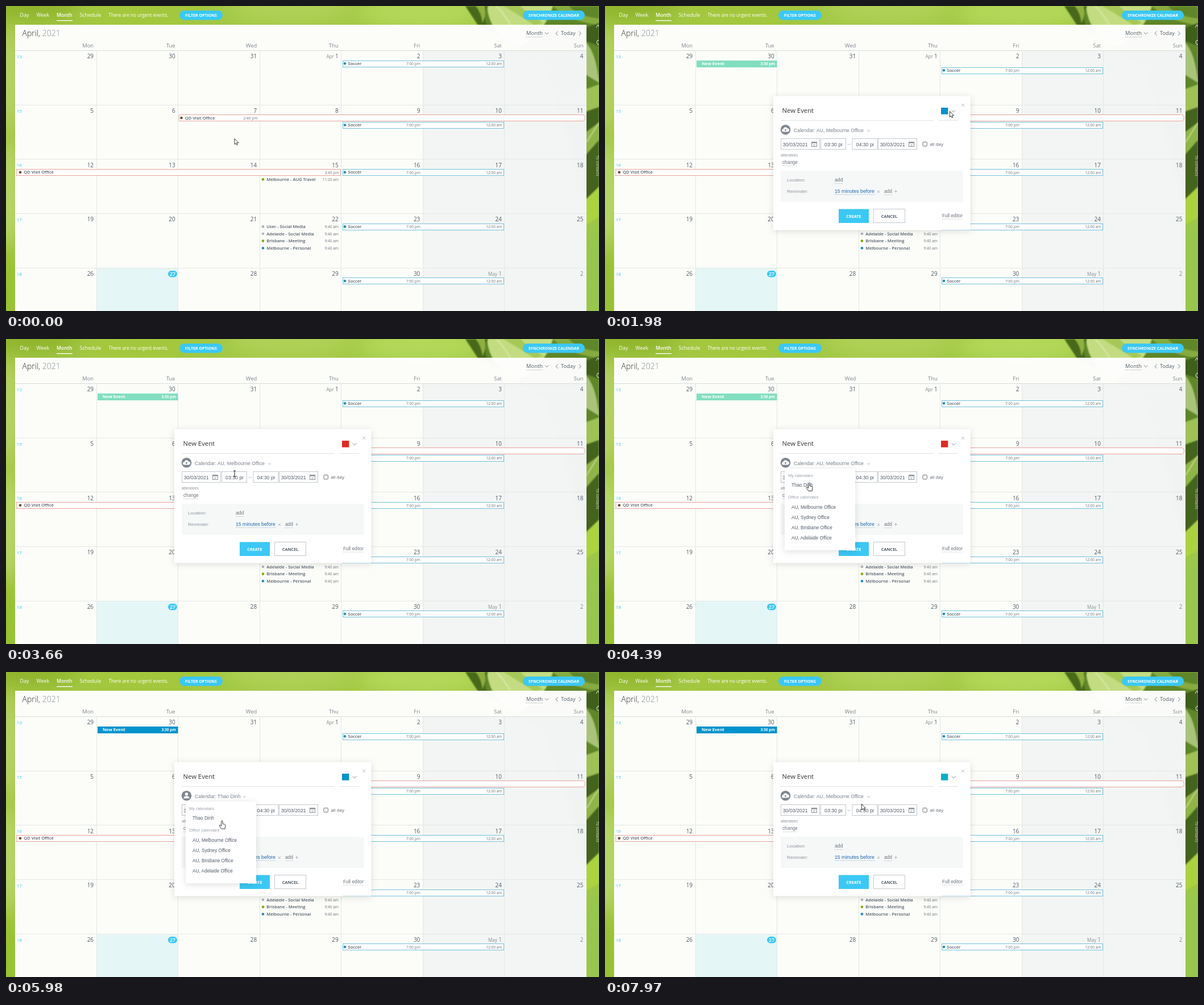
An HTML page for the animation above (8 s loop, 1043 px wide and 537 px high).

```html
<!DOCTYPE html>
<html lang="en">
<head>
<meta charset="utf-8">
<title>Calendar</title>
<style>
html, body { margin: 0; width: 100%; height: 100%; overflow: hidden; background: #a3c845; }
svg { display: block; }
text { font-family: "Open Sans", sans-serif; white-space: pre; }
.ar { font-family: "Liberation Sans", Arial, sans-serif; }
.blur { filter: blur(16px); }
.soft { filter: blur(1.2px); }
.shade { filter: drop-shadow(0 2px 6px rgba(0, 0, 0, .13)); }

/* 1% = 80 ms */
.step { animation: 8s step-end infinite; }
.shift { animation-name: shift; }
.event { animation-name: event; }
.fill { animation-name: fill; }
.sel { animation-name: sel; }
.title { animation-name: title; }
.swatch { animation-name: swatch; }
.picker { animation-name: picker; }
.drop { animation-name: drop; }
.office { animation-name: office; }
.person { animation-name: person; }
.arrow { animation-name: arrow; }
.beam { animation-name: beam; }
.hand { animation-name: hand; }
.click { animation-name: click; }
.popup { animation: popup 8s linear infinite; }
.cursor { animation: move 8s cubic-bezier(.4, .1, .6, .9) infinite; }

@keyframes shift { 0% { transform: none } 10%, 100% { transform: translateY(12px) } }
@keyframes event { 0% { opacity: 0 } 10%, 100% { opacity: 1 } }
@keyframes fill { 0% { fill: #82dec0 } 57%, 100% { fill: #0092cc } }
@keyframes popup { 0%, 11.8% { opacity: 0 } 12.8%, 100% { opacity: 1 } }
@keyframes sel { 0% { opacity: 1 } 23.6%, 100% { opacity: 0 } }
@keyframes title { 0% { fill: #fff } 23.6%, 100% { fill: #333 } }
@keyframes swatch { 0% { fill: #0092cc } 37.3% { fill: #de2b24 } 57% { fill: #0092cc } 95%, 100% { fill: #00afc7 } }
@keyframes picker { 0% { opacity: 0 } 26.8% { opacity: 1 } 37.3% { opacity: 0 } 88.3% { opacity: 1 } 95%, 100% { opacity: 0 } }
@keyframes drop { 0% { opacity: 0 } 49% { opacity: 1 } 57% { opacity: 0 } 70.8% { opacity: 1 } 79.5%, 100% { opacity: 0 } }
@keyframes office { 0% { opacity: 1 } 57% { opacity: 0 } 79.5%, 100% { opacity: 1 } }
@keyframes person { 0% { opacity: 0 } 57% { opacity: 1 } 79.5%, 100% { opacity: 0 } }
@keyframes arrow { 0% { opacity: 1 } 44.5% { opacity: 0 } 57.5% { opacity: 1 } 60.3% { opacity: 0 } 63.3% { opacity: 1 } 68.5% { opacity: 0 } 80% { opacity: 1 } 86.2% { opacity: 0 } 95.6%, 100% { opacity: 1 } }
@keyframes beam { 0% { opacity: 0 } 44.5% { opacity: 1 } 47%, 100% { opacity: 0 } }
@keyframes hand { 0% { opacity: 0 } 47% { opacity: 1 } 57.5% { opacity: 0 } 60.3% { opacity: 1 } 63.3% { opacity: 0 } 68.5% { opacity: 1 } 80% { opacity: 0 } 86.2% { opacity: 1 } 95.6%, 100% { opacity: 0 } }
@keyframes click {
  0%, 10%, 26.8%, 37.3%, 49%, 57%, 70.8%, 79.5%, 88.4%, 95%, 100% { opacity: 0 }
  9%, 25.8%, 36.3%, 48%, 56.3%, 70%, 78.8%, 87%, 94.2% { opacity: 1 }
}
@keyframes move {
  0%, 1% { transform: translate(401.5px, 233px) }
  8.7%, 14% { transform: translate(241.5px, 107px) }
  22.3%, 26.8% { transform: translate(606px, 185px) }
  36%, 37.5% { transform: translate(640px, 300px) }
  42.5% { transform: translate(524px, 262px) }
  45.75% { transform: translate(402px, 237px) }
  48%, 49.5% { transform: translate(392px, 220px) }
  53%, 57% { transform: translate(359px, 253px) }
  61.2%, 62.8% { transform: translate(597px, 181px) }
  67% { transform: translate(434px, 222px) }
  69.8%, 71.5% { transform: translate(398px, 218px) }
  77.5%, 79.5% { transform: translate(366px, 295px) }
  86.8%, 88.6% { transform: translate(595.5px, 184px) }
  94%, 95.2% { transform: translate(668px, 228px) }
  99.6%, 100% { transform: translate(451px, 232px) }
}
</style>
</head>
<body>
<svg id="stage" width="1043" height="537" viewBox="0 0 1043 537"></svg>
<script>
const rect = (x, y, w, h, fill, extra = '') =>
  `<rect x="${x}" y="${y}" width="${w}" height="${h}" fill="${fill}" ${extra}/>`;
const path = (d, fill, extra = '') => `<path d="${d}" fill="${fill}" ${extra}/>`;
const line = (d, color, w = 1, extra = '') => path(d, 'none', `stroke="${color}" stroke-width="${w}" ${extra}`);
const disc = (x, y, r, fill, extra = '') => `<circle cx="${x}" cy="${y}" r="${r}" fill="${fill}" ${extra}/>`;
const text = (x, y, size, fill, s, extra = '') =>
  `<text x="${x}" y="${y}" font-size="${size}" fill="${fill}" ${extra}>${s}</text>`;
const group = (cls, ...parts) => `<g class="${cls}">${parts.join('')}</g>`;
const END = 'text-anchor="end"', MID = 'text-anchor="middle"';
const SEMI = 'font-weight="600"', BOLD = 'font-weight="700"', LIGHT = 'font-weight="300"';
const AR = 'class="ar"', DASH = 'stroke-dasharray="2 1"';
const CYAN = '#3bc8f5', TEAL = '#1f8fb3', GREY = '#9aa1a9', INK = '#525c69';

const colX = c => 16 + c * 143.57;
const rowY = r => 79 + r * 95.7;
const slotY = (r, s) => rowY(r) + 22.3 + s * 12.6;
const barTop = y => Math.floor(y - 5.2) + .5;

function backdrop() {
  const blobs = [
    [40, 0, 90, 26, '#8fb42c'], [240, 10, 110, 30, '#a3c73c'], [500, 0, 110, 30, '#b0d158'],
    [730, 10, 110, 30, '#b4d85a'], [0, 130, 30, 90, '#b5d164'], [0, 330, 30, 90, '#b5d667'],
    [0, 510, 40, 80, '#98c233'], [1040, 470, 50, 90, '#98c64e'],
  ].map(([x, y, a, b, f]) => `<ellipse cx="${x}" cy="${y}" rx="${a}" ry="${b}" fill="${f}"/>`);
  return rect(0, 0, 1043, 537, '#a3c845') + group('blur', ...blobs) + group('soft',
    path('M808 0H1043V345L1012 345 985 230 950 110 880 60 830 34Z', '#5f8628'),
    path('M846 0Q850 50 900 72Q950 45 962 0Z', '#c3dc82'),
    path('M875 0Q905 18 930 34L945 30Q915 12 905 0Z', '#a6c856'),
    path('M808 0H848Q838 18 846 34L830 33Q820 18 808 0Z', '#48691a'),
    path('M826 0Q836 12 838 30Q846 14 842 0Z', '#8fb03f'),
    path('M962 0Q985 25 1043 34V22Q1005 18 990 0Z', '#86ab40'),
    path('M1015 40L1043 30V70L1020 62Z', '#3f5f1b'),
    path('M1018 62Q1038 80 1043 135L1018 120Z', '#a9c47a'),
    path('M1010 150L1043 138V178L1018 186Z', '#9fc257'),
    path('M985 200L1043 178V325L1018 345Z', '#44631d'),
    path('M1020 222L1043 205V236L1020 262Z', '#8fb548'),
    path('M1015 345L1043 318V372L1018 386Z', '#abd340'),
    line('M862 0Q885 22 900 60M1021 240L1043 205', '#e4f0bd', 1.3)) +
    text(0, 0, 7, '#fff', 'To contacts', 'transform="translate(1038 263) rotate(90)" opacity=".75"') +
    line('M1043 60a4 4 0 1 0 0 8M1038 38l3-5 3 5', '#e8f0dc');
}

function topBar() {
  const nav = [['Day', 24.5], ['Week', 53.5], ['Month', 89, SEMI], ['Schedule', 129.5]];
  return nav.map(([s, x, w = '']) => text(x, 19, w ? 8.6 : 8.9, '#fff', s, w)).join('') +
    rect(89, 25, 28, 1.3, '#fff') +
    text(180.5, 19, 8.2, '#fff', 'There are no urgent events.') +
    rect(305, 8, 76, 16.5, CYAN, 'rx="8.2"') + text(343, 19, 7, '#fff', 'FILTER OPTIONS', BOLD + MID) +
    rect(909, 8, 109, 16.5, CYAN, 'rx="8.2"') + text(963.5, 19, 7, '#fff', 'SYNCHRONIZE CALENDAR', BOLD + ' ' + MID);
}

function grid() {
  let out = rect(16, 33, 1005, 504, '#fff', 'opacity=".97"') +
    rect(733.5, 79, 287.5, 458, '#dfe7e6', 'opacity=".36"') +
    rect(160, 462, 143, 75, '#e5f6f7') +
    text(28.5, 53, 14, '#333', 'April, <tspan fill="#868d95">2021</tspan>', LIGHT) +
    text(915, 51, 9.4, INK, 'Month') + line('M915 54.5H944', '#b9bec3', 1, DASH) +
    line('M948 46.5l3.2 3 3.2-3M970.5 44.5l-3.4 3.7 3.4 3.7M1008 44.5l3.4 3.7-3.4 3.7', '#7b828a') +
    text(976, 51, 9.3, INK, 'Today');
  ['Mon', 'Tue', 'Wed', 'Thu', 'Fri', 'Sat', 'Sun'].forEach((s, c) =>
    out += text(colX(c + 1) - 5.5, 73, 9.4, '#7d858e', s, END));
  for (let c = 1; c < 7; c++) out += line(`M${Math.round(colX(c)) - .5} 79V537`, '#e4e7e5');
  for (let r = 0; r < 5; r++) {
    const y = rowY(r);
    out += line(`M16 ${Math.round(y) - .5}H1021`, r ? '#e4e7e5' : '#d8dcda');
    out += text(19, y + 13, 7.9, CYAN, r ? 14 + r : 13);
    for (let c = 0; c < 7; c++) {
      const d = r * 7 + c - 2, x = colX(c + 1) - 5.5;
      const month = d === 1 ? 'Apr ' : d === 31 ? 'May ' : '';
      const n = d < 1 ? d + 31 : d > 30 ? d - 30 : d;
      if (d === 27) {
        out += rect(285, y + 4.2, 16, 11.5, CYAN, 'rx="5.7"') +
          text(293, y + 13.3, 8.8, '#fff', n, SEMI + ' ' + MID);
      } else {
        out += text(x, y + 13.3, 10, d > 30 ? '#868d95' : INK,
          (month && `<tspan font-size="8.2" fill="#868d95">${month}</tspan>`) + n, END);
      }
    }
  }
  return out;
}

const time = (x, y, s) => text(x, y + 2.8, 6.6, '#6f767e', s, END);
const label = (x, y, color, s, gap = 6.2) => disc(x, y, 2.3, color) + text(x + gap, y + 2.6, 7.55, INK, s, SEMI);

function soccer(r, s) {
  const y = slotY(r, s);
  return rect(592.5, barTop(y), 283, 11, '#fff', 'fill-opacity=".8" stroke="#74c0dc"') +
    label(596, y, TEAL, 'Soccer', 5.5) + time(729, y, '7:00 pm') + time(872.5, y, '12:00 am');
}

function task(r, s, color, name, at) {
  const y = slotY(r, s);
  return label(452, y, color, name) + time(585, y, at);
}

function events() {
  const a = slotY(1, 0), b = slotY(2, 0), red = 'stroke="#e8a29a" fill-opacity=".85"';
  return group('step shift', soccer(0, 0)) + soccer(1, 1) + [2, 3, 4].map(r => soccer(r, 0)).join('') +
    path(`M1014 ${barTop(a)}Q1018 ${barTop(a)} 1018.5 ${a}Q1018 ${barTop(a) + 11} 1014 ${barTop(a) + 11}H306q-1.5 0-1.5-1.5v-8q0-1.5 1.5-1.5Z`, '#fff', red) +
    label(308.5, a, '#6b4a22', 'QD Visit Office') + time(442.5, a, '2:40 pm') +
    path(`M18 ${barTop(b)}H588.5v11H18l1.5-2.5-1.5-3 1.5-3Z`, '#fff', red) +
    label(25, b, '#6b4a22', 'QD Visit Office') + time(585.5, b, '3:40 pm') +
    task(2, 1, '#86a800', 'Melbourne - AUG Travel', '11:20 am') +
    task(3, 0, '#aeb4ba', 'User - Social Media', '9:40 am') +
    task(3, 1, '#aeb4ba', 'Adelaide - Social Media', '9:40 am') +
    task(3, 2, '#86a800', 'Brisbane - Meeting', '9:40 am') +
    task(3, 3, TEAL, 'Melbourne - Personal', '9:40 am') +
    group('step event',
      rect(161, 96, 141.5, 12, '#82dec0', 'class="step fill"'),
      text(170, 104, 7.5, '#fff', 'New Event', BOLD),
      text(299, 104, 6.6, '#fff', '3:30 pm', BOLD + ' ' + END));
}

function field(x, w, s, date) {
  const pad = date ? 3.7 : 7;
  let out = rect(x + .5, 233.5, w - 1, 19, '#fff', 'stroke="#c4cacf"') +
    `<svg x="${x}" y="233" width="${date ? w : 38.5}" height="20">${text(pad, 13.6, 8.8, INK, s, AR)}</svg>`;
  if (date) {
    const i = x + w - 15;
    out += rect(i + .5, 239.5, 9, 8, '#fff', 'stroke="#8b929a"') + rect(i, 239, 10, 2.5, '#8b929a') +
      line(`M${i + 3} 244h4.5M${i + 3} 245.8h3`, GREY, .8);
  }
  return out;
}

const chevron = x => line(`M${x - 2.4} 218.6l2.4 2.3 2.4-2.3`, GREY, .9);
const link = (x, y, w, size, s, fill = '#6b737c') =>
  text(x, y, size, fill, s, AR) + line(`M${x} ${y + 3.2}h${w}`, fill, .8, DASH + ' opacity=".45"');

function popup() {
  return group('popup',
    rect(296, 158.5, 346.5, 236, '#fff', 'class="shade"'),
    line('M627.3 172.3l4.4 4.4m0-4.4l-4.4 4.4', '#a3a9af', .9),
    rect(311, 176.5, 57, 14.5, '#3390ff', 'class="step sel"'),
    text(311.5, 188, 11.3, '#333', 'New Event', 'class="step title"'),
    line('M309 201.5H578M587 201.5H621', '#dfe2e5'),
    rect(591, 179, 12.3, 11.7, '#0092cc', 'class="step swatch"'),
    line('M609.5 183.3l3.7 3.5 3.7-3.5', '#8b929a'),
    disc(317.5, 217.8, 8.8, '#7f8791'),
    group('step office',
      path('M313.7 221.5a2.6 2.6 0 0 1 0-5.2a3.7 3.7 0 0 1 7-.8a3 3 0 0 1 .8 6Z', '#fff'),
      disc(317.5, 218.3, 1.5, '#7f8791'),
      text(332, 222.3, 8.73, '#7b838c', 'Calendar: AU, Melbourne Office', AR), chevron(463.5)),
    group('step person',
      disc(317.5, 215, 2.7, '#fff'), path('M312.4 222.6q.2-3.7 3.5-4.2h3.2q3.3.5 3.5 4.2Z', '#fff'),
      text(332, 222.3, 8.73, '#7b838c', 'Calendar: Thao Dinh', AR), chevron(419.5)),
    field(309, 69, '30/03/2021', true), field(379, 45, '03:30 pm'),
    line('M426.5 243.5H432', '#c5cad0'),
    field(434.5, 45, '04:30 pm'), field(480, 69, '30/03/2021', true),
    rect(559, 239.5, 7.3, 7.3, '#fff', 'stroke="#6f6f6f" rx="1"'),
    text(571.5, 246, 7.8, INK, 'all day'),
    text(309, 265, 6.8, '#8d949c', 'attendees', AR),
    link(312, 278.3, 27, 8.2, 'change'),
    rect(309, 290, 321, 55, '#f6f8f8'),
    text(320, 309.3, 8.1, '#8d949c', 'Location:', AR), link(404, 309.3, 14.5, 8.7, 'add'),
    text(320, 328.8, 8.1, '#8d949c', 'Reminder:', AR),
    link(404, 328.8, 70.5, 8.72, '15 minutes before', '#2067b0'),
    line('M478.8 324.8l4.2 4.2m0-4.2l-4.2 4.2M509 326.5h5M511.5 324v5', '#a8aeb4', .9),
    link(491, 329.3, 14, 8.3, 'add'),
    rect(411, 357.5, 53, 24.5, CYAN), text(437.5, 372.7, 7.3, '#fff', 'CREATE', BOLD + ' ' + MID),
    rect(472.5, 357.5, 55, 24, '#fff', 'stroke="#c3c9cf"'), text(500, 372.7, 7.3, INK, 'CANCEL', BOLD + ' ' + MID),
    link(593, 371.8, 36.5, 8.2, 'Full editor'));
}

function picker() {
  const colors = ['#86b100', '#0092cc', '#00afc7', '#da9100', '#00b38c', '#de2b24', '#bd7ac9', '#838fa0', '#ab7917', '#e97090'];
  return group('step picker',
    rect(570, 203, 150, 180, '#fff', 'class="shade"'),
    path('M591 203.5l6-6 6 6Z', '#fff'),
    ...colors.map((f, i) => rect(583 + i % 4 * 33, 217 + (i >> 2) * 33, 25, 25, f)),
    line('M583 330.5H707', '#e4e7ea'),
    text(583, 354, 8.7, '#7b838c', 'Custom color', AR));
}

function dropdown() {
  const rows = [
    ['My calendars', 243, 1], ['Thao Dinh', 260], ['Office calendars', 281, 1],
    ['AU, Melbourne Office', 299], ['AU, Sydney Office', 317], ['AU, Brisbane Office', 335], ['AU, Adelaide Office', 353],
  ];
  return group('step drop',
    rect(316, 228, 124, 144, '#fff', 'class="shade"'),
    ...rows.map(([s, y, head]) => text(head ? 322 : 328, y, head ? 7.4 : 8.2, head ? GREY : INK, s, AR)));
}

function cursor() {
  const edge = 'stroke="#222" stroke-width=".9" stroke-linejoin="round"';
  return group('cursor',
    disc(-.5, .5, 8, '#ffdf1a', 'fill-opacity=".6" class="step click"'),
    path('M.4 .4V10.6L2.7 8.5 4.2 11.8 5.9 11 4.4 7.8H7.4Z', '#fff', edge + ' class="step arrow"'),
    line('M-2-5h4M-2 5h4M0-5V5', '#222', 1, 'class="step beam"'),
    path('M-1.2 1.4a1.2 1.2 0 0 1 2.4 0V5.8L4.8 6.6Q6.2 7 6 8.8L5.2 14.6H-1L-4.6 9.3Q-5 7.4-3 8L-1.2 9.6Z', '#fff', edge + ' class="step hand"'));
}

document.getElementById('stage').innerHTML =
  backdrop() + topBar() + grid() + events() + popup() + dropdown() + picker() + cursor();
</script>
</body>
</html>
```
